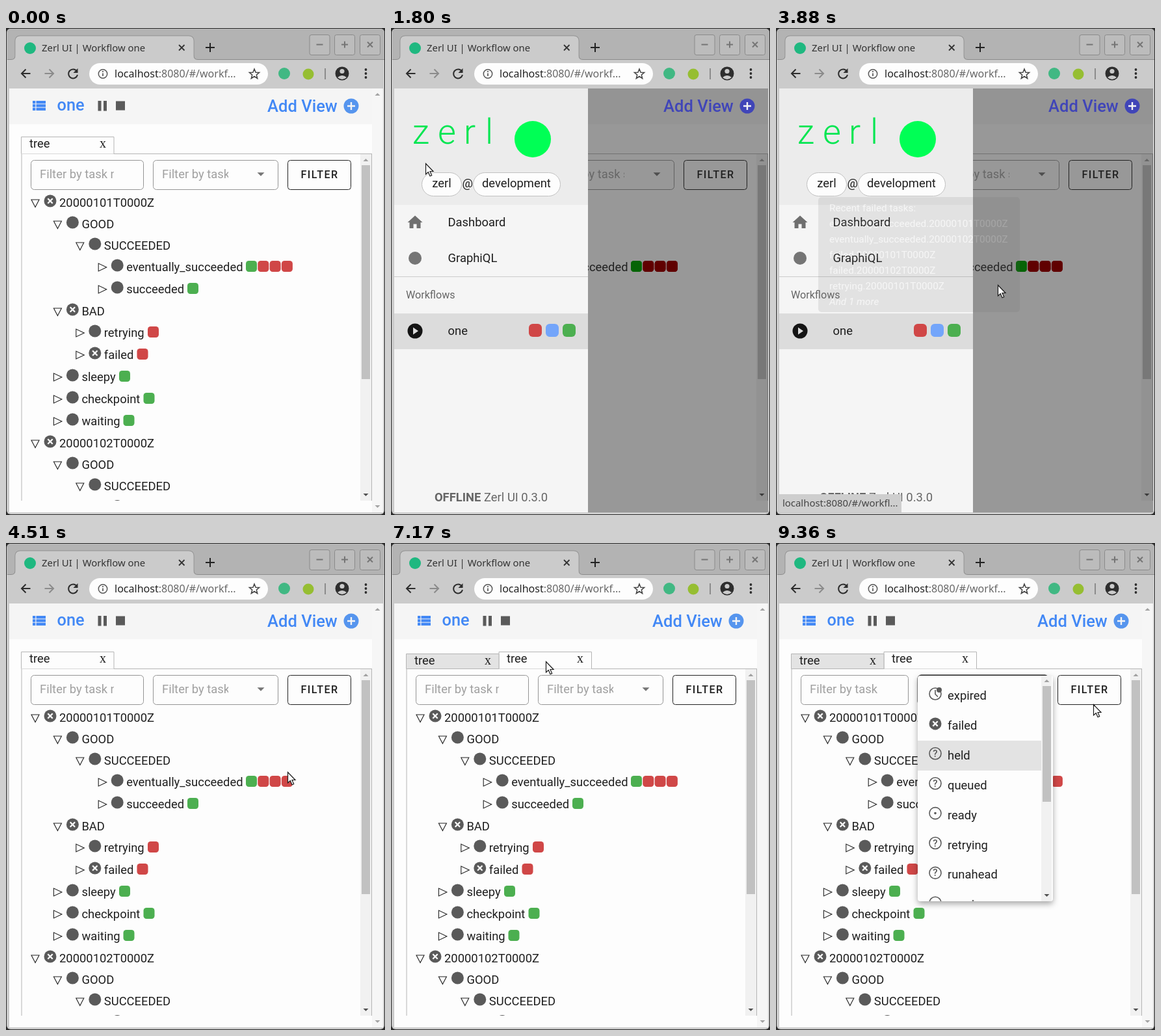
These frames come from a looping animation (583x749 px, 9.39 s). An HTML page:

```html
<!DOCTYPE html>
<html lang="en">
<head>
<meta charset="utf-8">
<title>Zerl UI</title>
<style>
html, body { margin: 0; width: 100%; height: 100%; overflow: hidden; background: #cbcbcb; }
svg { display: block; width: 583px; height: 749px; }
text { font-family: Roboto, sans-serif; white-space: pre; }
.ui { font-family: "Noto Sans", "Open Sans", sans-serif; }
.serif { font-family: "Liberation Serif", serif; }
.lift { filter: drop-shadow(0 4px 5px rgba(0,0,0,.34)); }
</style>
</head>
<body>
<svg id="stage" viewBox="0 0 583 749"></svg>
<script>
const LOOP = 9390;
const GREEN = '#4caf50', RED = '#d04747', BLUE = '#4288f5', GREY = '#5a5a5a', INK = '#1f1f1f';
const FS = 18.4;

// ---- shape helpers
const text = (x, y, s, size = FS, fill = INK, more = '') =>
  `<text x="${x}" y="${y}" font-size="${size}" fill="${fill}" ${more}>${s}</text>`;
const rect = (x, y, w, h, fill, r = 0, more = '') =>
  `<rect x="${x}" y="${y}" width="${w}" height="${h}" rx="${r}" fill="${fill}" ${more}/>`;
const circle = (x, y, r, fill, more = '') => `<circle cx="${x}" cy="${y}" r="${r}" fill="${fill}" ${more}/>`;
const line = (d, stroke = INK, w = 1, more = '') =>
  `<path d="${d}" fill="none" stroke="${stroke}" stroke-width="${w}" ${more}/>`;
const fill = (d, color) => `<path d="${d}" fill="${color}"/>`;
const group = (id, body, more = '') => `<g id="${id}" ${more}>${body}</g>`;
const ring = (x, y, r, w = 1.6) => circle(x, y, r, 'none', `stroke="${GREY}" stroke-width="${w}"`);
const up = (x, y, c) => fill(`M${x - 4} ${y + 2}h8l-4 -4z`, c);
const down = (x, y, c, r = 4) => fill(`M${x - r} ${y - r / 2}h${2 * r}l${-r} ${r}z`, c);
const crossed = (x, y) => circle(x, y, 9.5, GREY) +
  line(`M${x - 3.7} ${y - 3.7}l7.4 7.4m0 -7.4l-7.4 7.4`, '#fff', 2.3);
const square = (x, y, c, s = 17, r = 4.5) => rect(x, y, s, s, c, r);

// ---- browser window
function chrome() {
  let s = rect(0, 0, 583, 749, '#2b2b2b') + rect(1, 1, 581, 747, '#cbcbcb', 6) +
    fill('M1.5 49V7q0 -6 6 -6H576q6 0 6 6V49z', '#b3b3b3') +
    line('M2 48.5H8q6 0 6 -6V20q0 -8 8 -8H281q8 0 8 8V42q0 6.500 6 6.500H582', '#8b8b8b') +
    fill('M2 49H8q6.500 0 6.500 -6V20q0 -7.500 7.500 -7.500H281q7.500 0 7.500 7.500V43q0 6 6 6H582V93H2z', '#cbcbcb') +
    circle(37, 31, 9, '#1fb880') +
    text(55, 36, 'Zerl UI | Workflow one', 14.9, '#333', 'class="ui"') +
    line('M266 26l8.500 8.500m0 -8.500l-8.500 8.500', '#333', 1.8) +
    line('M307 30h14m-7 -7v14', '#222', 2);
  [467, 505.5, 544.5].forEach((x, i) => {
    const c = x + 15.5;
    s += rect(x, 10.5, 31, 31, '#bcbcbc', 3, 'stroke="#8a8a8a"') +
      line([`M${c - 5} 25.5h10`, `M${c - 5} 25.5h10m-5 -5v10`, `M${c - 4} 21.5l8 8m0 -8l-8 8`][i], '#757575', 2);
  });
  s += line('M37.500 70H24m6.500 -6.500l-6.500 6.500l6.500 6.500', '#2d2d2d', 2) +
    line('M59.500 70H73m-6.500 -6.500l6.500 6.500l-6.500 6.500', '#8b8b8b', 2) +
    line('M109 66.500A7 7 0 1 0 110 72', '#2d2d2d', 2) + fill('M110.500 62v7h-7z', '#2d2d2d') +
    rect(128, 54, 275, 33, '#fdfdfd', 16.5) +
    circle(149, 70.5, 6.7, 'none', 'stroke="#555" stroke-width="1.5"') + line('M149 69.500v4.500m0 -8v2', '#555', 1.7) +
    text(167, 76, '<tspan fill="#222">localhost</tspan>:8080/#/workf...', 16.05, '#666', 'class="ui"');
  let star = '';
  for (let i = 0; i < 10; i++) {
    const a = -Math.PI / 2 + i * Math.PI / 5, r = i % 2 ? 3.5 : 8;
    star += (i ? 'L' : 'M') + (382 + r * Math.cos(a)).toFixed(1) + ' ' + (71 + r * Math.sin(a)).toFixed(1);
  }
  return s + line(star + 'z', '#444', 1.5) +
    circle(428, 70, 9, '#41b883') + circle(465, 71, 8.5, '#96be32') + line('M491 62v17', '#777', 1.5) +
    circle(517, 70, 10.5, '#2e2e2e') + circle(517, 66.5, 3.6, '#cbcbcb') + fill('M510 76q7 -6 14 0q-7 6 -14 0z', '#cbcbcb') +
    [64, 70, 76].map(y => circle(553.5, y, 1.9, '#2d2d2d')).join('');
}

// ---- page
// level, open, icon crossed, centre y, label, squares x, squares
const ROWS = [
  [0, 1, 1, 268, '20000101T0000Z'], [1, 1, 0, 301, 'GOOD'], [2, 1, 0, 334, 'SUCCEEDED'],
  [3, 0, 0, 367, 'eventually_succeeded', 369, 'grrr'], [3, 0, 0, 401, 'succeeded', 279, 'g'],
  [1, 1, 1, 435, 'BAD'], [2, 0, 0, 468, 'retrying', 218, 'r'], [2, 0, 1, 502, 'failed', 201.5, 'r'],
  [1, 0, 0, 536, 'sleepy', 174, 'g'], [1, 0, 0, 570, 'checkpoint', 211.5, 'g'], [1, 0, 0, 604, 'waiting', 180.5, 'g'],
  [0, 1, 1, 638, '20000102T0000Z'], [1, 1, 0, 671, 'GOOD'], [2, 1, 0, 704, 'SUCCEEDED'],
  [3, 0, 0, 737.5, 'eventually_succeeded']
];
const squares = (x, y, kinds, g = GREEN, r = RED) =>
  [...kinds].map((k, i) => square(x + i * 18.3, y - 9, k === 'g' ? g : r)).join('');

function treeRow([level, open, cross, y, label, sx, kinds = '']) {
  const d = level * 34.4, x = 45 + d;
  return line(open ? `M${x - 6} ${y - 4}h12l-6 11.500z` : `M${x - 6} ${y - 5}v12l12.500 -6z`, '#222', 1.1) +
    (cross ? crossed(68 + d, y - 2) : circle(68 + d, y - 2, 9.5, GREY)) +
    text(82 + d, y + 7, label) + squares(sx, y, kinds);
}

const addView = (x, c, disc) => text(x, 129, 'Add View', 25.5, c, 'font-weight="500"') +
  circle(x + 129, 120, 11.5, disc) + line(`M${x + 123} 120h12m-6 -6v12`, '#f5f5f5', 2.4);

const tab = (id, x) => group(id, `<path/>` + group(id + 'Text',
  text(x + 12, 184, 'tree') + text(x + 120, 184, 'x', 20, INK, 'class="serif"')));

function page() {
  const bars = [112, 117.3, 122.6].map(y => rect(41, y, 4.3, 4.3, BLUE) + rect(46.5, y, 14.5, 4.3, BLUE)).join('');
  return rect(5, 93, 575, 652, '#fdfdfd') + rect(5, 93, 575, 55, '#f5f5f5') + bars +
    text(78.5, 127, 'one', 25.3, BLUE, 'font-weight="500"') +
    rect(141.5, 112, 5, 15.5, GREY) + rect(150, 112, 5, 15.5, GREY) + rect(169, 112.5, 14, 14, GREY) +
    group('add', addView(402, BLUE, '#5695ee')) +
    line('M24 727V193.500H563', '#b5b5b5', 1, 'id="frame"') +
    tab('tab2', 166) + tab('tab1', 24) +
    `<g clip-path="url(#panel)">${ROWS.map(treeRow).join('')}</g>` +
    rect(38.5, 203.5, 173, 45, 'none', 5, 'stroke="#959595" id="nameBox"') +
    `<g clip-path="url(#nameClip)">${text(52, 231, 'Filter by task name', FS, '#a0a0a0')}</g>` +
    rect(226.5, 203.5, 192, 45, 'none', 5, 'stroke="#959595" id="stateBox"') +
    `<g clip-path="url(#stateClip)">${text(240, 231, 'Filter by task state', FS, '#a0a0a0', 'id="stateText"')}</g>` +
    group('right', down(392, 225, '#757575', 5.5) +
      rect(433.5, 203.5, 97, 45, 'none', 4, 'stroke="#222"') +
      text(453.5, 231, 'FILTER', 16.1, INK, 'font-weight="500" letter-spacing="1.44"') +
      rect(545, 194, 17, 533, '#f1f1f1') + rect(547, 211, 13, 329, '#c1c1c1') + up(553.5, 203, '#a0a0a0') +
      down(553.5, 718, '#505050') + line('M562.500 193v534', '#b5b5b5')) +
    group('outer', rect(563, 93, 17, 652, '#f6f6f6') + up(571.5, 102, '#a3a3a3') + down(571.5, 736, '#a3a3a3')) +
    rect(5, 93, 575, 652, '#212121', 0, 'id="shade"') +
    group('lit', addView(419, '#4045b8', '#4045b8')) +
    group('litHalf', squares(369, 367, 'grrr', GREEN, '#b00000')) +
    group('litFull', squares(369, 367, 'grrr', '#066406', '#600000'));
}

// ---- side drawer
function drawer() {
  const name = [...'zerl'].map((c, i) =>
    text([46, 86, 121, 151][i], 178, c, 54, '#00e650', 'text-anchor="middle" font-weight="300"')).join('');
  return group('drawer', rect(5, 93, 298, 652, '#f5f5f5') + rect(5, 93, 298, 179, '#ececec') +
    name + circle(218, 171, 28, '#00ff55') +
    rect(47.5, 222.5, 61, 36, '#fdfdfd', 18, 'stroke="#c0c0c0"') + text(78, 245, 'zerl', FS, INK, 'text-anchor="middle"') +
    text(109.5, 245, '@', FS) +
    rect(126.5, 222.5, 134, 36, '#fdfdfd', 18, 'stroke="#c0c0c0"') + text(140, 245, 'development') +
    fill('M37 288.500L48.500 299H45.500V308H39.500V301.500H34.500V308H28.500V299H25.500z', '#6f6f6f') + text(87.5, 305, 'Dashboard') +
    circle(37, 354, 10, '#757575') + text(87.5, 360, 'GraphiQL') +
    line('M5 382.500H303', '#cbcbcb') + text(23, 416, 'Workflows', 16.1, '#666') +
    rect(5, 439, 298, 55, '#dcdcdc') + circle(37, 466, 11.5, '#141414') + fill('M34 460.500l8 5.500l-8 5.500z', '#dcdcdc') +
    text(87.5, 472, 'one') + square(212, 455, RED, 20, 6) + square(238, 455, '#73a5fa', 20, 6) + square(264, 455, GREEN, 20, 6) +
    text(154, 728, '<tspan font-weight="700">OFFLINE</tspan> Zerl UI 0.3.0', FS, '#666', 'text-anchor="middle"'));
}

function hints() {
  const day = n => `.2000010${n}T0000Z`;
  const lines = ['Recent failed tasks:', 'eventually_succeeded' + day(1), 'eventually_succeeded' + day(2),
    'failed' + day(1), 'failed' + day(2), 'retrying' + day(1), 'And 1 more'];
  return group('status', fill('M5 745V717H189q4 0 4 4V745z', '#cecece') +
      text(10, 736, 'localhost:8080/#/workfl...', 14.9, '#444', 'class="ui"')) +
    group('tip', rect(65, 260, 310, 177, '#616161', 5, 'opacity=".9"') +
      lines.map((s, i) => text(82, 282 + 24 * i, s, 15.3, '#fff', i === 6 ? 'font-style="italic"' : '')).join(''));
}

// ---- menus
function stateIcon(name, x, y) {
  if (name === 'failed') return crossed(x, y);
  if (name === 'expired') return ring(x, y, 9) + line(`M${x} ${y - 6}v6.500l4 4`, GREY, 1.6) + circle(x + 6, y - 6, 4, GREY);
  if (name === 'ready' || name === 'running') return ring(x, y, 9) + circle(x, y, 1.8, GREY);
  return ring(x, y, 9) + text(x, y + 5, '?', 15, GREY, 'text-anchor="middle" font-weight="500"');
}
function stateMenu() {
  const names = ['expired', 'failed', 'held', 'queued', 'ready', 'retrying', 'runahead', 'running'];
  return group('states', rect(218, 204, 208, 347, '#fdfdfd', 4, 'class="lift"') +
    rect(218, 304, 190, 46, '#e3e3e3', 0, 'id="held"') +
    `<g clip-path="url(#menuClip)">` + names.map((n, i) => {
      const y = 235 + 45.9 * i;
      return stateIcon(n, 245, y - 3) + text(264, y + 6, n);
    }).join('') + '</g>' +
    rect(408, 204, 16, 347, '#f1f1f1') + rect(410, 220, 13, 178, '#c1c1c1') + up(416.5, 212, '#a0a0a0') + down(416.5, 542, '#505050'));
}
const viewMenu = () => group('views', rect(368, 137, 174, 160, '#fdfdfd', 4, 'class="lift"') +
  ['Tree', 'Graph', 'Mutations'].map((s, i) => text(386, 175 + 48 * i, s)).join(''));

const clip = (id, x, y, w, h) => `<clipPath id="${id}">${rect(x, y, w, h, '#000')}</clipPath>`;
document.getElementById('stage').innerHTML =
  '<defs>' + clip('panel', 24, 194, 521, 533) + clip('nameClip', 50, 204, 116, 44) +
  clip('stateClip', 226, 204, 116, 44) + clip('menuClip', 218, 204, 190, 347) + clip('pageClip', 5, 93, 575, 652) + '</defs>' +
  chrome() + `<g clip-path="url(#pageClip)">${page()}${drawer()}${hints()}${viewMenu()}${stateMenu()}</g>` +
  group('cursor', `<path d="M.500 .500V17L4.300 13.500L7 19.800L9.700 18.600L7 12.500H12z" fill="#fff" stroke="#1a1a1a" stroke-width="1.200"/>`);

// ---- motion
const $ = id => document.getElementById(id);
const clamp = v => Math.min(1, Math.max(0, v));
const ramp = (t, a, b) => clamp((t - a) / (b - a));
const smooth = p => p * p * (3 - 2 * p);
const swift = p => {
  let u = p;
  for (let i = 0; i < 6; i++) {
    const x = 1.2 * u * (1 - u) ** 2 + .6 * u * u * (1 - u) + u ** 3;
    u = clamp(u - (x - p) / (1.2 * (1 - u) * (1 - 3 * u) + .6 * u * (2 - 3 * u) + 3 * u * u + .01));
  }
  return 3 * u * u * (1 - u) + u ** 3;
};
const show = (id, o) => {
  const el = $(id);
  el.style.display = o > 0 ? '' : 'none';
  el.setAttribute('opacity', Number(o));
};
const set = (el, map) => { for (const k in map) el.setAttribute(k, map[k]); };

// time, x, y
const PATH = [
  [580, 62, 135], [780, 52, 122], [1600, 52, 122], [1800, 53, 208], [2150, 118, 387], [2350, 161, 374], [2510, 149, 347],
  [2810, 90, 462], [2950, 90, 462], [3300, 218, 463], [3550, 222, 463], [3880, 341, 395], [4170, 415, 368], [4320, 415, 368],
  [4510, 433, 352], [5170, 541, 125], [5690, 541, 125], [5980, 420, 166], [6120, 418, 167], [6600, 243, 183], [6690, 238, 182],
  [7610, 238, 182], [8130, 300, 222], [8850, 300, 222], [9040, 306, 324], [9120, 306, 324], [9360, 488, 248]
];
function pointer(t) {
  let i = PATH.findIndex(k => k[0] > t);
  if (i < 0) i = PATH.length;
  const a = PATH[Math.max(0, i - 1)], b = PATH[Math.min(i, PATH.length - 1)];
  const p = a === b ? 0 : smooth(ramp(t, a[0], b[0]));
  return [a[1] + (b[1] - a[1]) * p, a[2] + (b[2] - a[2]) * p];
}

function drawTab(id, x, active) {
  const y = active ? 167.5 : 170.5;
  set($(id).firstChild, {
    d: `M${x} 193.5V${y}h142.5V193.5${active ? '' : 'z'}`,
    fill: active ? '#fdfdfd' : '#e3e3e3', stroke: '#b5b5b5'
  });
  $(id + 'Text').setAttribute('transform', `translate(0 ${active ? 0 : 3})`);
}

function layout(wide, picked, focus, hover) {
  const grow = wide ? 8.5 : picked ? -8 : 0, dx = wide ? 17 : 0;
  set($('nameBox'), { width: 173 + grow });
  set($('nameClip').firstChild, { width: 116 + grow });
  set($('stateBox'), {
    x: 226.5 + grow, width: 192 + dx - grow,
    stroke: focus || hover ? '#222' : '#959595', 'stroke-width': focus ? 2 : 1
  });
  set($('stateText'), { x: 240 + grow });
  set($('stateClip').firstChild, { x: 226 + grow, width: 116 + dx - grow });
  set($('right'), { transform: `translate(${dx} 0)` });
  set($('frame'), { d: `M24 727V193.5H${563 + dx}` });
}

function render(t) {
  const open = t < 4000 ? swift(ramp(t, 960, 1160)) : 1 - swift(ramp(t, 4320, 4490));
  const dim = t < 4000 ? ramp(t, 960, 1100) : open;
  set($('drawer'), { transform: `translate(${(open - 1) * 298} 0)` });
  show('drawer', open > 0);
  show('shade', .46 * dim);
  const lit = dim > .3, full = dim > .95;
  show('outer', !lit);
  show('add', !lit);
  show('lit', lit);
  show('litHalf', lit && !full);
  show('litFull', full);

  layout(t >= 1200 && t < 4480, t >= 9120, t >= 8350, t >= 8000);

  show('status', ramp(t, 2940, 2960) * (1 - ramp(t, 3960, 4100)));
  show('tip', ramp(t, 3200, 3350) * (1 - ramp(t, 3760, 3900)));

  const views = smooth(ramp(t, 5350, 5480)) * (1 - ramp(t, 6100, 6250));
  show('views', views);
  const k = t < 5500 ? views : 1;
  set($('views'), { transform: `translate(${542 * (1 - k)} ${137 * (1 - k)}) scale(${k})` });

  const second = t >= 7170;
  drawTab('tab1', 23.5, !second);
  drawTab('tab2', 166, second);
  show('tab2', t >= 6140);

  const drop = smooth(ramp(t, 8340, 8640));
  show('states', drop);
  set($('states'), { transform: `translate(${t < 9120 ? 8 : 0} ${204 * (1 - drop)}) scale(1 ${drop})` });
  show('held', t >= 9010);

  const [x, y] = pointer(t);
  set($('cursor'), { transform: `translate(${x} ${y})` });
  show('cursor', t >= 580);
}

const start = performance.now();
(function tick() {
  render((performance.now() - start) % LOOP);
  requestAnimationFrame(tick);
})();
</script>
</body>
</html>
```
